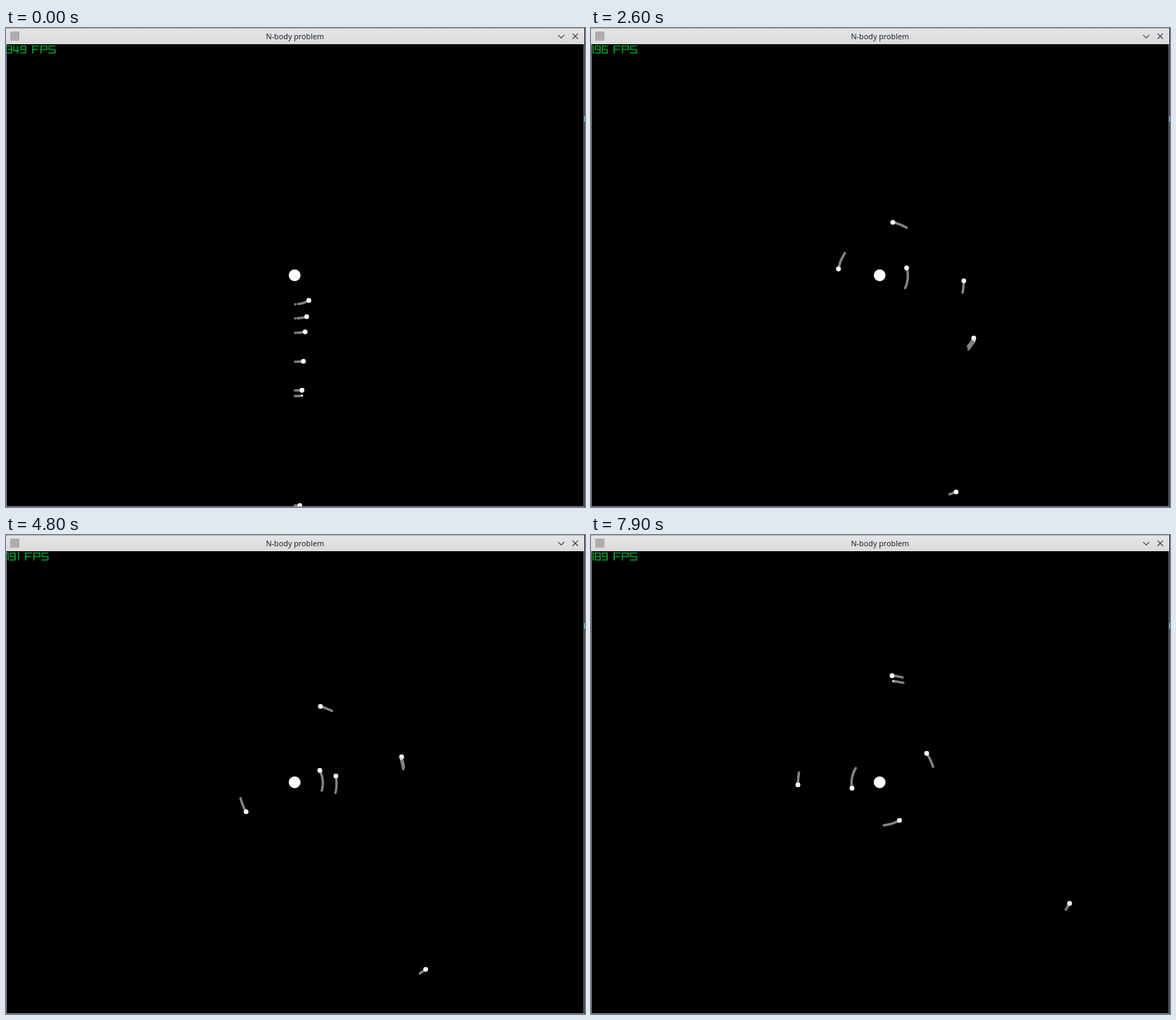
Animation of 823 by 680 pixels, one loop 8 s. Source, as an HTML page with a canvas:

```html
<!DOCTYPE html>
<html lang="en">
<head>
<meta charset="utf-8">
<title>N-body problem</title>
<style>
html, body { margin: 0; width: 100%; height: 100%; overflow: hidden; background: #000; }
canvas { display: block; }
</style>
</head>
<body>
<canvas id="stage" width="823" height="680"></canvas>
<script>
const ctx = document.getElementById('stage').getContext('2d');
const RAD = Math.PI / 180;
const LOOP = 8, STEP = 0.1;
const SUN = { x: 410.3, y: 351.1 };
const START = -0.185, TRAIL = 0.25;
const PULL = 42525; // degrees per second at radius 1

// All bodies leave straight below the sun on slightly eccentric orbits.
const orbits = [
  { radius: 40, ecc: 0.026, aphelion: 0 },
  { radius: 59.5, ecc: 0.028, aphelion: 0 },
  { radius: 79.6, ecc: 0.026, aphelion: 0 },
  { radius: 117.8, ecc: 0.043, aphelion: 20 },
  { radius: 312, ecc: 0.048, aphelion: 0 },
  { radius: 158, ecc: 0.035, aphelion: -5 }
];
const host = orbits[5];

const fps = [349, 199, 198, 196, 188, 191, 197, 197, 189];

// Pixel letters: width in cells, then polylines of grid points "xy".
const glyphs = {
  1: [2, '00 10 16'],
  3: [5, '00 40 46 06|13 43'],
  4: [5, '00 04 44|30 36'],
  6: [5, '40 00 06 46 43 03'],
  7: [5, '00 40 46'],
  8: [5, '00 40 46 06 00|03 43'],
  9: [5, '43 03 00 40 46 06'],
  F: [6, '50 00 06|03 43'],
  P: [6, '06 00 50 53 03'],
  S: [6, '50 00 03 53 56 06'],
  ' ': [3, '']
};

function polar(r, angle) {
  return [SUN.x + r * Math.sin(angle * RAD), SUN.y + r * Math.cos(angle * RAD)];
}

// Kepler's third law sets the speed; the sine terms are the first-order ellipse.
function orbitAt({ radius, ecc, aphelion }, t) {
  const swing = a => 2 * ecc / RAD * Math.sin((a - aphelion) * RAD);
  const mean = swing(0) + PULL * radius ** -1.5 * (t - START);
  const angle = mean - swing(mean);
  return [radius * (1 + ecc * Math.cos((angle - aphelion) * RAD)), angle];
}

// The moon drifts from outside its host to inside, with growing wobbles.
function moonAt(t) {
  const age = t - START;
  const [r, angle] = orbitAt(host, t);
  const wobble = 0.85 * age * Math.sin(Math.PI * (t - 1.9) / 2.8) ** 4;
  return polar(r + 8 - 1.95 * age + wobble, angle - 1 + Math.exp(-age));
}

function disc([x, y], r) {
  ctx.fillStyle = '#fff';
  ctx.beginPath();
  ctx.arc(x, y, r, 0, 2 * Math.PI);
  ctx.fill();
}

function line(points) {
  ctx.beginPath();
  points.forEach(p => ctx.lineTo(...p));
  ctx.stroke();
}

function drawBody(place, t, radius) {
  ctx.strokeStyle = '#828282';
  ctx.lineWidth = 3.5;
  ctx.lineCap = ctx.lineJoin = 'round';
  // The first step lags, which leaves a lone dot behind each body.
  if (t - TRAIL < START) line([place(START + 0.008), place(START + 0.0085)]);
  const from = Math.max(START + 0.045, t - TRAIL);
  line(Array.from({ length: 13 }, (_, i) => place(from + (t - from) * i / 12)));
  disc(place(t), radius);
}

function drawFps(text) {
  ctx.save();
  ctx.translate(1.3, 25.5);
  ctx.scale(5 / 3, 5 / 3);
  ctx.strokeStyle = '#009e2f';
  ctx.lineWidth = 1;
  ctx.lineCap = 'square';
  ctx.lineJoin = 'miter';
  for (const ch of text) {
    const [width, path] = glyphs[ch];
    if (path) path.split('|').forEach(s => line(s.split(' ').map(p => [+p[0], +p[1]])));
    ctx.translate(width + 1, 0);
  }
  ctx.restore();
}

function rect(color, x, y, w, h) {
  ctx.fillStyle = color;
  ctx.fillRect(x, y, w, h);
}

function drawWindow() {
  const bar = ctx.createLinearGradient(0, 0, 0, 23);
  bar.addColorStop(0, '#e3e5e7');
  bar.addColorStop(1, '#d9dbdd');
  rect(bar, 0, 0, 822, 23);
  rect('#a9abad', 0, 0, 822, 1);
  rect('#8f9193', 0, 23, 1, 657);
  rect('#8f9193', 821, 23, 1, 657);
  rect('#8f9193', 0, 679, 822, 1);
  rect('#1c1e20', 822, 0, 1, 680);
  rect('#3daee9', 822, 125, 1, 8);
  rect('#b0acab', 6, 5, 13, 13);
  ctx.fillStyle = '#232629';
  ctx.font = '10.8px "Noto Sans", sans-serif';
  ctx.textAlign = 'center';
  ctx.fillText('N-body problem', 410.8, 15.8);
  ctx.strokeStyle = '#3a3d40';
  ctx.lineWidth = 1.1;
  ctx.lineCap = 'butt';
  ctx.lineJoin = 'miter';
  line([[784.8, 9.8], [789.2, 14.2], [793.6, 9.8]]);
  line([[805.3, 7.8], [813, 15.5]]);
  line([[813, 7.8], [805.3, 15.5]]);
}

function draw(t) {
  rect('#000', 0, 0, 823, 680);
  disc([SUN.x, SUN.y], 8.4);
  for (const orbit of orbits) drawBody(s => polar(...orbitAt(orbit, s)), t, 3.4);
  drawBody(moonAt, t, 1.2);
  drawFps(fps[Math.floor(t + 0.5 + 1e-6)] + ' FPS');
  drawWindow();
}

const begin = performance.now();
function tick() {
  const t = (performance.now() - begin) / 1000 % LOOP;
  draw(Math.floor(t / STEP + 1e-6) * STEP);
  requestAnimationFrame(tick);
}
tick();
</script>
</body>
</html>
```
